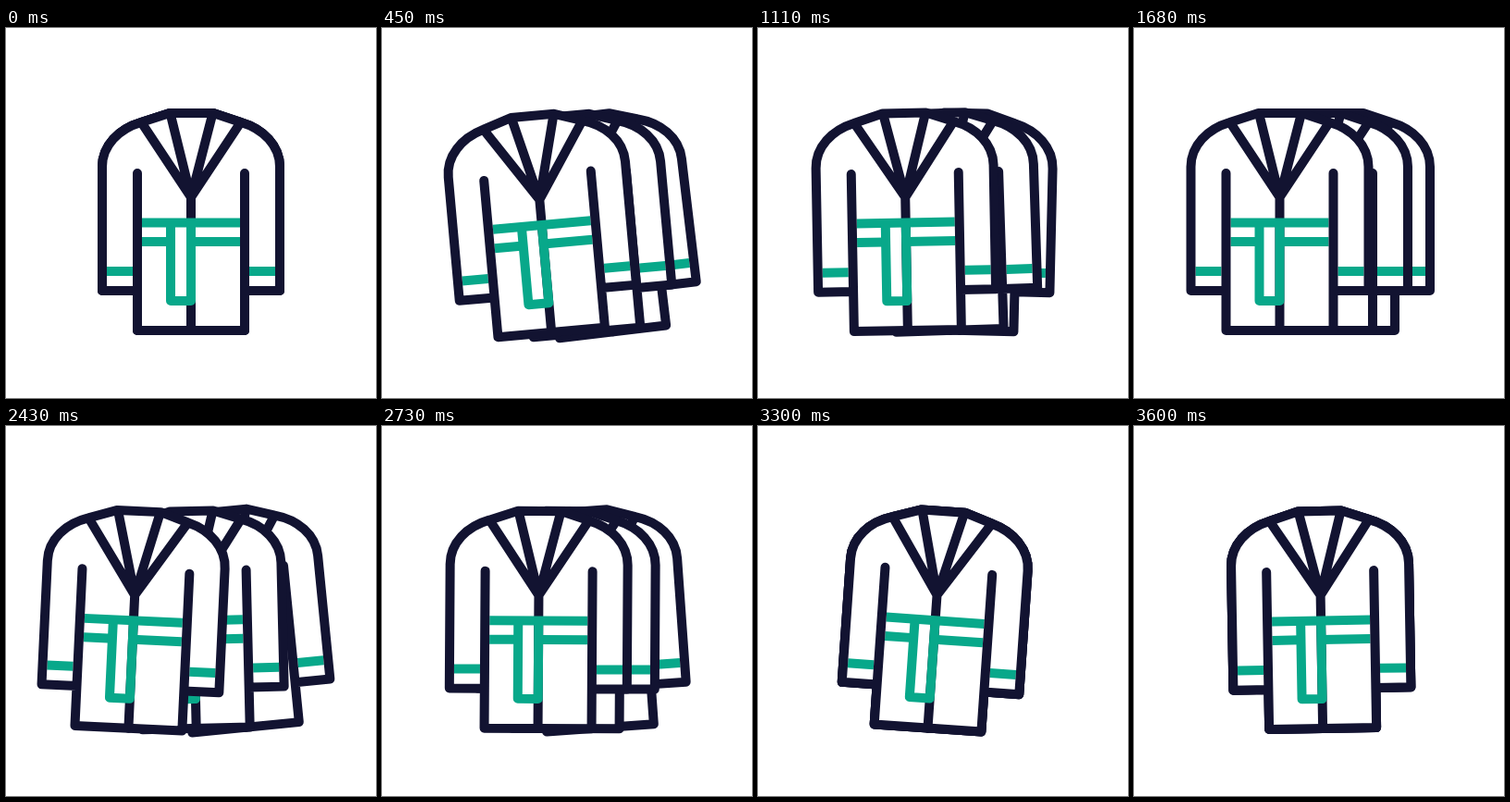
Write an HTML page with a canvas that moves like this. It is 400 px wide and 400 px high and loops after 5630 ms.

```html
<!DOCTYPE html>
<html lang="en">
<head>
<meta charset="utf-8">
<title>Bathrobes</title>
<style>
html, body { margin: 0; width: 100%; height: 100%; overflow: hidden; background: #fff; }
canvas { display: block; width: 400px; height: 400px; }
</style>
</head>
<body>
<canvas id="stage" width="400" height="400"></canvas>
<script>
const ctx = document.getElementById('stage').getContext('2d');
const LOOP = 5630, STEP = 30, END = 3600;
const INK = '#121331', GREEN = '#08a88a';
const PIVOT = { x: 200, y: 90 };

const shoulders = 'M104 284V150C104 127 122 109 146 102L177 92H224L254 102C278 109 296 127 296 150V284';
const shapes = {
  fill: new Path2D(shoulders + 'H258V327H142V284Z'),
  outline: new Path2D(shoulders + 'H258M104 284H142M142 157V327H258V157'),
  lapels: new Path2D('M147 103L200 183L253 103M178 94L200 183L223 94M200 183V327'),
  belt: new Path2D('M147 210.5H253M147 231H178M200 231H253M109 263H137M263 263H291'),
  tail: new Path2D('M178 211V295H200V211')
};

// Keys are [ms, value]; angles in degrees, positive is clockwise.
const settle = [[2950, -8], [3290, 4], [END, -1]];
const still = [[1680, 0], [2160, 0]];
const robes = [
  {
    slide: [[0, 0], [570, 24], [2160, 24], [2500, 37], [2970, 0]],
    swing: [[0, 0], [450, -6.8], [900, 3.4], [1380, -1.7], ...still, [2220, 0], [2580, -9], [2770, -3.5], ...settle]
  },
  {
    slide: [[0, 0]],
    swing: [[0, 0], [300, -8], [770, 4], [1150, -2], ...still, [2450, -1.4], [2650, 2], ...settle]
  },
  {
    slide: [[0, 0], [570, -42.5], [2160, -42.5], [2500, -58], [2970, 0]],
    swing: [[0, 0], [270, -10.6], [720, 5.2], [1230, -2], ...still, [2600, 4], ...settle]
  }
];

function valueAt(keys, t) {
  const i = keys.findIndex(k => k[0] > t);
  if (i < 0) return keys[keys.length - 1][1];
  if (i === 0) return keys[0][1];
  const [t0, a] = keys[i - 1], [t1, b] = keys[i];
  const u = (t - t0) / (t1 - t0);
  return a + (b - a) * (1 - Math.cos(Math.PI * u)) / 2;
}

function line(path, color, cap) {
  ctx.strokeStyle = color;
  ctx.lineCap = cap;
  ctx.stroke(path);
}

function drawRobe(robe, t) {
  const dip = t < 900 ? 3 * Math.sin(Math.PI * t / 900) : 0;
  ctx.save();
  ctx.translate(PIVOT.x + valueAt(robe.slide, t), PIVOT.y + dip);
  ctx.rotate(valueAt(robe.swing, t) * Math.PI / 180);
  ctx.translate(-PIVOT.x, -PIVOT.y);
  ctx.fillStyle = '#fff';
  ctx.fill(shapes.fill);
  line(shapes.lapels, INK, 'round');
  line(shapes.belt, GREEN, 'butt');
  line(shapes.tail, GREEN, 'butt');
  line(shapes.outline, INK, 'round');
  ctx.restore();
}

function frame(now) {
  const t = Math.min(Math.floor((now % LOOP) / STEP) * STEP, END);
  ctx.fillStyle = '#fff';
  ctx.fillRect(0, 0, 400, 400);
  ctx.lineWidth = 10;
  ctx.lineJoin = 'round';
  robes.forEach(robe => drawRobe(robe, t));
}

let start = null;
function tick(now) {
  if (start === null) start = now;
  frame(now - start);
  requestAnimationFrame(tick);
}
frame(0);
requestAnimationFrame(tick);
</script>
</body>
</html>
```
